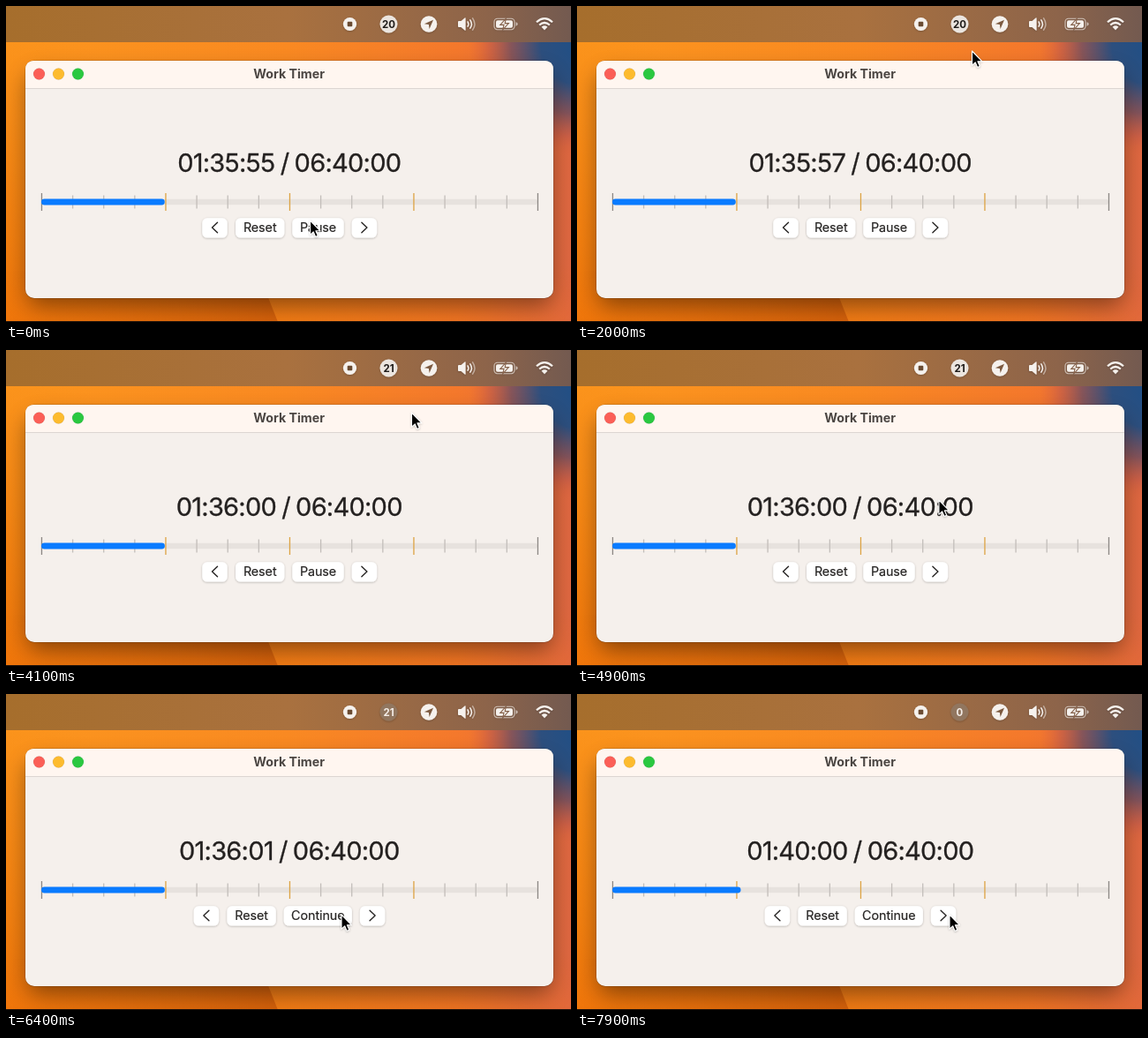
An HTML page for the animation above (8000 ms loop, 640x358 px).

```html
<!DOCTYPE html>
<html lang="en">
<head>
<meta charset="utf-8">
<title>Work Timer</title>
<style>
html, body { margin: 0; width: 100%; height: 100%; overflow: hidden; background: #e8750f; }
svg { display: block; width: 100vw; height: 100vh; }
text { font-family: Inter, "Liberation Sans", sans-serif; font-optical-sizing: none; text-anchor: middle; }
#clock { font-size: 29px; letter-spacing: -.75px; word-spacing: -1.2px; fill: #242120; stroke: #242120; stroke-width: .3px; }
.label { font-size: 14.3px; letter-spacing: -.05px; fill: #262423; stroke: #262423; stroke-width: .2px; }
.title { font-size: 14.2px; font-weight: 700; fill: #4b4643; }
#count { font-size: 11.5px; font-weight: 700; }
</style>
</head>
<body>
<svg id="stage" viewBox="0 0 640 358" preserveAspectRatio="none">
  <defs>
    <linearGradient id="sky">
      <stop offset="0" stop-color="#fc961d"/>
      <stop offset=".5" stop-color="#f98922"/>
      <stop offset=".8" stop-color="#f4782c"/>
      <stop offset="1" stop-color="#e06842"/>
    </linearGradient>
    <linearGradient id="low" x1=".8" y1="0" x2="0" y2="1">
      <stop offset=".4" stop-color="#e86a00" stop-opacity="0"/>
      <stop offset="1" stop-color="#e86400" stop-opacity=".65"/>
    </linearGradient>
    <linearGradient id="fold">
      <stop offset="0" stop-color="#c04a00" stop-opacity="0"/>
      <stop offset="1" stop-color="#b84600" stop-opacity=".5"/>
    </linearGradient>
    <radialGradient id="blue">
      <stop offset="0" stop-color="#1f4f86"/>
      <stop offset=".35" stop-color="#2d4f7e"/>
      <stop offset=".62" stop-color="#75505f" stop-opacity=".85"/>
      <stop offset=".82" stop-color="#c05a4a" stop-opacity=".6"/>
      <stop offset="1" stop-color="#e0663c" stop-opacity="0"/>
    </radialGradient>
    <linearGradient id="bar">
      <stop offset="0" stop-color="#a66e2c"/>
      <stop offset=".5" stop-color="#a9713f"/>
      <stop offset=".85" stop-color="#8d644a"/>
      <stop offset="1" stop-color="#735a50"/>
    </linearGradient>
    <filter id="windowShadow" x="-20%" y="-20%" width="140%" height="150%">
      <feGaussianBlur stdDeviation="13"/>
    </filter>
    <filter id="soft" x="-30%" y="-30%" width="160%" height="180%">
      <feDropShadow dx="0" dy=".7" stdDeviation=".8" flood-color="#000" flood-opacity=".28"/>
    </filter>
  </defs>

  <rect width="640" height="358" fill="url(#sky)"/>
  <rect width="640" height="358" fill="url(#low)"/>
  <path d="M0 300H285L308 358H0Z" fill="url(#fold)"/>
  <ellipse cx="650" cy="45" rx="126" ry="126" fill="url(#blue)"/>
  <rect x="24" y="76" width="594" height="264" rx="12" fill="#000" opacity=".42" filter="url(#windowShadow)"/>
  <rect width="640" height="41" fill="url(#bar)"/>
  <rect y="357" width="640" height="1" fill="#1a100a"/>

  <g id="menu" fill="#f5f1ed" filter="url(#soft)">
    <circle cx="389.5" cy="20.5" r="7.6"/>
    <rect x="386.7" y="17.7" width="5.6" height="5.6" rx="1" fill="#6b4c31"/>
    <circle cx="479" cy="20.5" r="9.3"/>
    <path d="M484 15.8 473.8 20.2 478.9 20.9 479.6 26Z" fill="#7c5a40"/>
    <path d="M512 18q0-1 1-1h2.6l4-3.6q1-.7 1 .4v13.4q0 1.1-1 .4l-4-3.6H513q-1 0-1-1Z"/>
    <g fill="none" stroke="#f5f1ed" stroke-width="1.5" stroke-linecap="round">
      <path d="M523 17.8q1.7 2.7 0 5.4"/>
      <path d="M525.8 15.8q3.2 4.7 0 9.4"/>
      <path d="M528.6 13.8q4.6 6.7 0 13.4" opacity=".5"/>
      <rect x="553" y="14.3" width="23" height="12.4" rx="3.6" stroke-width="1.1" opacity=".65"/>
    </g>
    <rect x="555" y="16.2" width="19" height="8.6" rx="2"/>
    <path d="M577.6 18.3q2 .6 2 2.2t-2 2.2Z" opacity=".65"/>
    <path d="M566.4 14.2 559.8 21.4H564L562.7 26.8 569.4 19.6H565.2Z" stroke="#84604a" stroke-width="1.1"/>
    <g fill="none" stroke="#f5f1ed" stroke-width="2.2">
      <path d="M601 18.2q9-8 18 0"/>
      <path d="M604.2 21.5q5.8-5 11.6 0"/>
    </g>
    <path d="M606.6 23.7q3.4-2.7 6.8 0L610 27.2Z"/>
  </g>
  <circle id="badge" cx="433.5" cy="20.5" r="10" filter="url(#soft)"/>
  <text id="count" x="433.5" y="24.6"></text>

  <rect x="21.5" y="61.5" width="599" height="270" rx="10.5" fill="#000" opacity=".25"/>
  <rect x="22" y="62" width="598" height="269" rx="10" fill="#f5f0ec"/>
  <path d="M22 93V72q0-10 10-10H610q10 0 10 10V93Z" fill="#fff6f0"/>
  <path d="M22 93.5H620" stroke="#dcd6d2"/>
  <g stroke="#000" stroke-opacity=".12" stroke-width=".6">
    <circle cx="37.5" cy="77" r="6.5" fill="#fb5f57"/>
    <circle cx="59.5" cy="77" r="6.5" fill="#fdbb2e"/>
    <circle cx="81.5" cy="77" r="6.5" fill="#2ac840"/>
  </g>
  <text class="title" x="320.6" y="81.6">Work Timer</text>
  <text id="clock" x="320.7" y="188"></text>

  <rect x="40" y="218.8" width="562" height="6.4" rx="3.2" fill="#e7e2de"/>
  <g id="ticks"></g>
  <rect id="fill" x="40" y="218.6" height="6.8" rx="3.4" fill="#0a7bff"/>
  <g id="buttons"></g>
  <path id="cursor" d="M0 0V16.2L3.7 12.8 6.1 18.4 8.8 17.2 6.4 11.8H11.5Z" fill="#000" stroke="#fff" stroke-width="1.1" stroke-linejoin="round" filter="url(#soft)"/>
</svg>
<script>
const LOOP = 8000, STEP = 100;
const PAUSE_AT = 5900, SKIP_AT = 7500, FIRST_TICK = 50;
const START = 95 * 60 + 55, INTERVAL = 25 * 60, TOTAL = 400 * 60;

const $ = id => document.getElementById(id);
const add = (parent, tag, attrs, text = "") => {
  const el = document.createElementNS("http://www.w3.org/2000/svg", tag);
  for (const k in attrs) el.setAttribute(k, attrs[k]);
  el.textContent = text;
  return parent.appendChild(el);
};

const linear = u => u;
const smooth = u => u * u * (3 - 2 * u);
const out = u => 1 - (1 - u) ** 3;

// time, x, y, easing of the leg that ends here
const path = [
  [0, 344.5, 243, linear],
  [800, 344.5, 243, linear],
  [1100, 435.5, 84, linear],
  [1700, 439, 28, out],
  [2000, 447.5, 51, linear],
  [2600, 459.5, 71, out],
  [4400, 459.5, 71, linear],
  [5300, 374.5, 241, smooth],
  [5400, 374.5, 241, linear],
  [5900, 380, 250, smooth],
  [6400, 380, 250, linear],
  [7200, 422, 250, smooth],
  [LOOP, 422, 250, linear]
];

function cursorAt(t) {
  const i = path.findIndex((p, n) => n && t <= p[0]);
  const [t0, x0, y0] = path[i - 1], [t1, x1, y1, ease] = path[i];
  const u = ease((t - t0) / (t1 - t0));
  return [x0 + (x1 - x0) * u, y0 + (y1 - y0) * u];
}

for (let i = 0; i <= 16; i++) {
  const major = i % 4 === 0;
  const color = i % 16 === 0 ? "#8b8784" : major ? "#dda344" : "#c3beba";
  const half = major ? 10 : 7.5;
  add($("ticks"), "rect", { x: 39.8 + i * 35.125, y: 222 - half, width: 1.3, height: half * 2, fill: color });
}

function button(parent, x, w, label) {
  const mid = x + w / 2;
  add(parent, "rect", { x: x + .3, y: 240.3, width: w - .6, height: 22.2, rx: 5.5, fill: "#fff", filter: "url(#soft)" });
  if (label === "<" || label === ">") {
    const s = label === "<" ? 3 : -3;
    add(parent, "path", { d: `M${mid + s} 245.2L${mid - s} 251 ${mid + s} 256.8`, fill: "none",
      stroke: "#262423", "stroke-width": 1.4, "stroke-linecap": "round", "stroke-linejoin": "round" });
  } else add(parent, "text", { x: mid, y: 256.2, class: "label" }, label);
}

function buttonRow(x, label, w) {
  const row = add($("buttons"), "g", {});
  button(row, x, 29, "<");
  button(row, x + 37.7, 56, "Reset");
  button(row, x + 102, w, label);
  button(row, x + 110.4 + w, 29, ">");
  return row;
}
const running = buttonRow(222, "Pause", 59);
const stopped = buttonRow(212.4, "Continue", 77.8);

const pad = n => String(Math.floor(n)).padStart(2, "0");
const hms = s => [s / 3600, s / 60 % 60, s % 60].map(pad).join(":");

function secondsAt(t) {
  if (t >= SKIP_AT) return 4 * INTERVAL;
  return START + Math.floor((Math.min(t, PAUSE_AT) - FIRST_TICK) / 1000) + 1;
}

function draw(t) {
  const s = secondsAt(t), paused = t >= PAUSE_AT;
  $("clock").textContent = hms(s) + " / " + hms(TOTAL);
  $("fill").setAttribute("width", 5 + 562 * s / TOTAL);
  $("count").textContent = Math.floor(s % INTERVAL / 60);
  $("count").setAttribute("fill", paused ? "#f3ece6" : "#1f1c1a");
  $("badge").setAttribute("fill", paused ? "#91765f" : "#ebe5df");
  running.style.display = paused ? "none" : "";
  stopped.style.display = paused ? "" : "none";
  $("cursor").setAttribute("transform", `translate(${cursorAt(t)})`);
}

const began = performance.now();
function frame() {
  const t = (performance.now() - began) % LOOP;
  draw(Math.floor(t / STEP) * STEP);
  requestAnimationFrame(frame);
}
frame();
</script>
</body>
</html>
```
